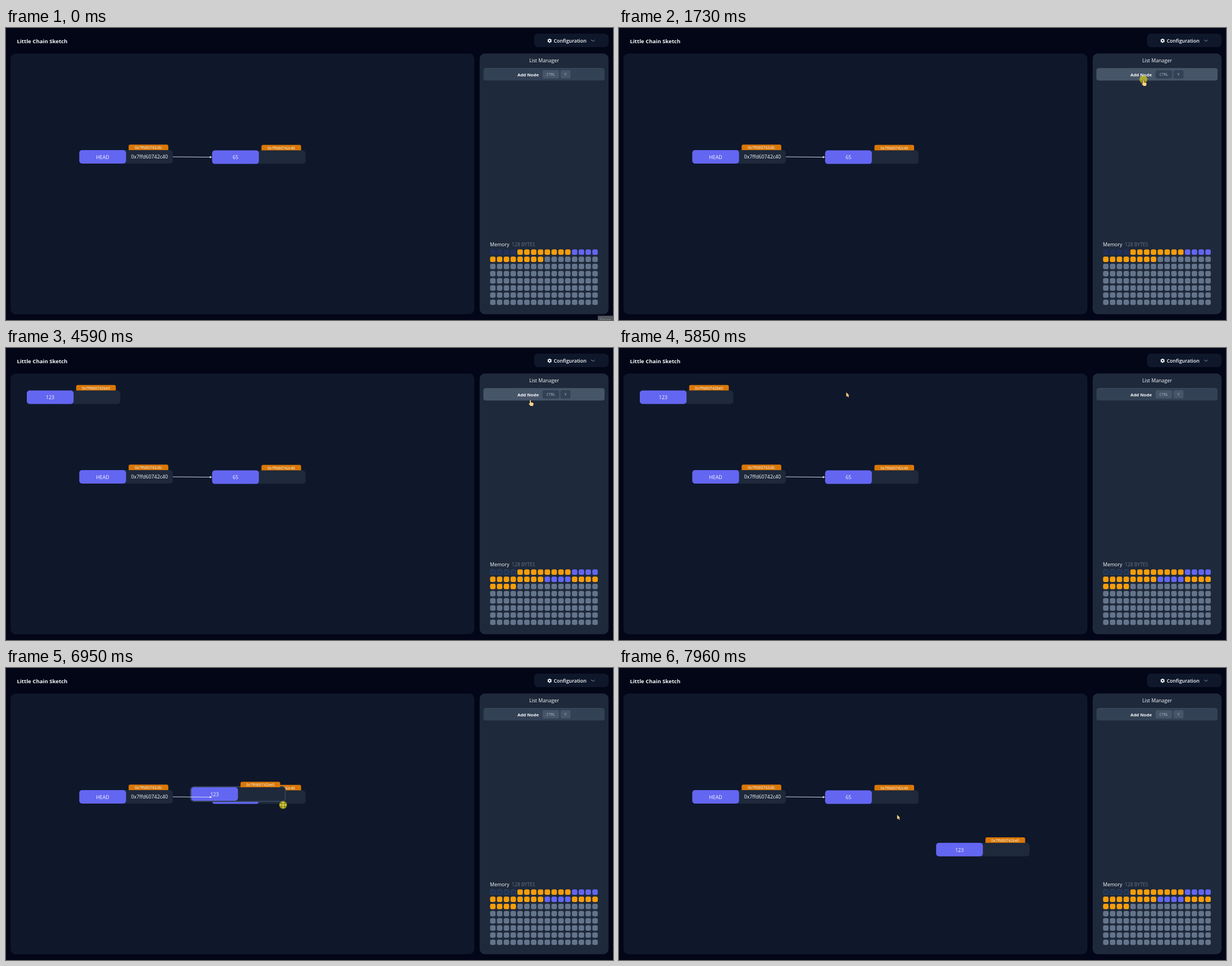
These frames come from a looping animation (1080 by 519 pixels, 8000 ms). An HTML page with a canvas:

```html
<!DOCTYPE html>
<html lang="en">
<head>
<meta charset="utf-8">
<title>Little Chain Sketch</title>
<style>
  html, body { margin: 0; width: 100%; height: 100%; overflow: hidden; background: #020617; }
  canvas { display: block; }
</style>
</head>
<body>
<canvas id="stage" width="1080" height="519"></canvas>
<script>
const ctx = document.getElementById('stage').getContext('2d');
const LOOP = 8000, TICK = 70;
const OPEN_FORM = 1880, SUBMIT = 4450, GRAB = 6460, DROP = 7355;
const WHITE = '#f8fafc', INDIGO = '#6366f1', AMBER = '#f59e0b';
const S900 = '#0f172a', S800 = '#1e293b', S700 = '#334155', S600 = '#475569', S500 = '#64748b', S400 = '#94a3b8';

// Paths: [time, x, y]
const cursorPath = [
  [430, 985, 495], [770, 945, 250], [1120, 922, 105], [1180, 922, 105], [1660, 933, 91.5],
  [5310, 933, 91.5], [5450, 857, 43], [5590, 710, 22], [5940, 200, 116], [6040, 145, 124],
  [6180, 168, 95], [6460, 168, 95], [6600, 202.5, 123.5], [6740, 302, 168], [6950, 493, 243.5],
  [7210, 656, 305], [7280, 698, 329], [7355, 698, 329], [7960, 494.5, 260.5]
];
const nodePath = [
  [6460, 37, 75.5], [6600, 57, 93.5], [6740, 146, 136], [6950, 329.5, 212],
  [7210, 502, 277], [7280, 564.2, 310.7]
];

const clamp = v => Math.max(0, Math.min(1, v));

// Position on a path, advanced in ticks like a screen recording
function along(path, t) {
  const i = path.findIndex(p => p[0] > t);
  if (i === 0) return path[0].slice(1);
  if (i < 0) return path[path.length - 1].slice(1);
  const [t0, x0, y0] = path[i - 1], [t1, x1, y1] = path[i];
  const n = Math.max(1, Math.round((t1 - t0) / TICK));
  const k = Math.floor((t - t0) / (t1 - t0) * n + 1e-6) / n;
  return [x0 + (x1 - x0) * k, y0 + (y1 - y0) * k];
}

function box(x, y, w, h, r, fill, stroke, width = 1) {
  ctx.beginPath();
  ctx.roundRect(x, y, w, h, r);
  if (fill) { ctx.fillStyle = fill; ctx.fill(); }
  if (stroke) { ctx.strokeStyle = stroke; ctx.lineWidth = width; ctx.stroke(); }
}

function text(s, x, y, size, color = WHITE, weight = 400, align = 'center') {
  ctx.font = `${weight} ${size}px "Open Sans", "Noto Sans", sans-serif`;
  ctx.textAlign = align;
  ctx.fillStyle = color;
  ctx.fillText(s, x, y);
}

function line(points, color, width) {
  ctx.beginPath();
  points.forEach(([x, y]) => ctx.lineTo(x, y));
  ctx.strokeStyle = color;
  ctx.lineWidth = width;
  ctx.stroke();
}

function shape(d, x, y, fill, stroke) {
  const p = new Path2D(d);
  ctx.save();
  ctx.translate(x, y);
  ctx.fillStyle = fill;
  ctx.strokeStyle = stroke;
  ctx.lineWidth = 0.9;
  ctx.stroke(p);
  ctx.fill(p);
  ctx.restore();
}

function node(x, y, label, address, next = '', lifted = false) {
  if (lifted) box(x - 1, y - 1, 168.4, 26, 6, S800, S700, 2);
  box(x, y, 166.4, 24, 5, S800);
  box(x, y, 83.2, 24, 5, INDIGO);
  box(x + 87.8, y - 9.8, 70.6, 9.8, [3, 3, 0, 0], '#d97706');
  text(address, x + 123, y - 1.8, 6.6);
  text(label, x + 41.6, y + 15.8, 8.8);
  text(next, x + 124.8, y + 15.4, 8.8);
}

function header() {
  text('Little Chain Sketch', 19.5, 26.5, 9.6, WHITE, 700, 'left');
  box(939.5, 10, 132.5, 24, 7, S900);
  ctx.beginPath();
  ctx.arc(967.2, 22.6, 2.2, 0, 7);
  ctx.strokeStyle = WHITE;
  ctx.lineWidth = 1.8;
  ctx.stroke();
  for (let i = 0; i < 6; i++) {
    const c = Math.cos(i * Math.PI / 3 + 0.52), s = Math.sin(i * Math.PI / 3 + 0.52);
    line([[967.2 + 2.6 * c, 22.6 + 2.6 * s], [967.2 + 3.9 * c, 22.6 + 3.9 * s]], WHITE, 1.7);
  }
  text('Configuration', 974.5, 25.9, 8.8, WHITE, 600, 'left');
  line([[1041.2, 20.9], [1044.3, 24], [1047.4, 20.9]], S400, 1);
}

function addButton(hover) {
  box(849.5, 71.5, 215.5, 21.8, 4, S700);
  ctx.globalAlpha = hover;
  box(849.5, 71.5, 215.5, 21.8, 4, S600);
  ctx.globalAlpha = 1;
  line([[853, 71.8], [1061, 71.8]], S600, 0.7);
  text('Add Node', 929, 85.7, 7.8, WHITE, 700);
  for (const [label, x, w] of [['CTRL', 954.7, 29.5], ['Y', 986.6, 17.8]]) {
    box(x, 75, w, 14.8, 3, S600);
    ctx.globalAlpha = hover;
    box(x, 75, w, 14.8, 3, S700);
    ctx.globalAlpha = 1;
    text(label, x + w / 2, 85, 6.4, S400, 600);
  }
}

function form(t) {
  box(849, 71, 216.5, 23, 4.5, S700, '#0b0f16', 1);
  box(848.5, 70.5, 217.5, 24, 5, null, WHITE, 1.2);
  const typed = t < 4095 ? '' : t < 4190 ? '12' : '123';
  text(typed || 'Data', 854, 85.6, 7.7, typed ? WHITE : S400, 400, 'left');
  if (typed || Math.floor((t - OPEN_FORM) / 530) % 2 === 0) {
    const x = 854.5 + (typed ? ctx.measureText(typed).width : 0);
    line([[x, 77.5], [x, 88.5]], WHITE, 0.8);
  }
  box(849.5, 97.3, 215.5, 21.8, 4, S700);
  text('Add', 957.3, 111.3, 7.8, WHITE, 700);
}

function memory(t) {
  text('Memory', 861, 387.8, 8.8, WHITE, 400, 'left');
  text('128 BYTES', 899.8, 387.8, 8.6, S500, 400, 'left');
  for (let i = 0; i < 128; i++) {
    const x = 861.3 + (i % 16) * 12.13, y = 393.6 + Math.floor(i / 16) * 12.72;
    if (i < 4) {
      box(x, y, 9.7, 9.7, 3, '#222e5a');
      if (t >= OPEN_FORM) {
        ctx.setLineDash([2, 1.5]);
        box(x + 0.4, y + 0.4, 8.9, 8.9, 3, '#1f3152', '#41687a', 0.8);
        ctx.setLineDash([]);
      }
      continue;
    }
    const added = t >= SUBMIT && i < 36;
    const data = (i > 11 && i < 16) || (added && i > 23 && i < 28);
    box(x, y, 9.7, 9.7, 3, data ? INDIGO : i < 24 || added ? AMBER : S500);
  }
}

function cursor(t) {
  if (t < 430) return;
  const [x, y] = along(cursorPath, t);
  const pressed = (t >= 1730 && t < OPEN_FORM) || (t >= GRAB && t < DROP);
  if (pressed) {
    ctx.beginPath();
    ctx.arc(x, y, 7, 0, 7);
    ctx.fillStyle = 'rgba(255, 240, 0, .54)';
    ctx.fill();
  }
  const overButton = (t >= 1320 && t < OPEN_FORM) || (t >= SUBMIT && t < 5380);
  if (overButton) {
    shape('M-1 .8Q0 0 .8 1V4.5L4.8 5.5Q6 6 5.6 8L4.5 11H.2L-2.8 7.5Q-3 6-1 7Z', x, y + 0.5, '#fbd38d', '#2a2118');
  } else if (t >= OPEN_FORM && t < SUBMIT) {
    line([[x - 1, 86.5], [x + 3, 86.5]], '#1b2028', 0.9);
    line([[x + 1, 86.5], [x + 1, 95]], '#1b2028', 0.9);
    line([[x - 1, 95], [x + 3, 95]], '#1b2028', 0.9);
  } else if (t >= 6110 && t < DROP) {
    for (let i = 0; i < 4; i++) {
      ctx.save();
      ctx.translate(x, y);
      ctx.rotate(i * Math.PI / 2);
      line([[0, 0], [5.4, 0]], '#f5ea6a', 1);
      line([[3.9, -1.5], [5.4, 0], [3.9, 1.5]], '#f5ea6a', 0.9);
      ctx.restore();
    }
  } else {
    shape('M.4 .4V8.2L2.2 6.6L3.6 9.4L5 8.7L3.6 6H5.8Z', x, y, '#fbd38d', '#2a2118');
  }
}

function draw(t) {
  box(0, 0, 1080, 519, 0, '#020617');
  header();
  box(8, 45.3, 825.3, 463.4, 9, S900);
  box(842.7, 45.3, 229.3, 463.4, 9, S800);
  text('List Manager', 957.3, 61.3, 8.8);

  const hover = t < OPEN_FORM ? clamp((t - 1320) / 150)
    : t < 5380 ? clamp((t - SUBMIT) / 140)
    : 1 - clamp((t - 5380) / 150);
  if (t >= OPEN_FORM && t < SUBMIT) form(t); else addButton(hover);
  memory(t);

  node(130.4, 217, 'HEAD', '0x7ffd60742c8c', '0x7ffd60742c40');
  node(366.7, 217.6, '65', '0x7ffd60742c40');
  if (t >= SUBMIT) {
    const [x, y] = along(nodePath, t);
    node(x, y, '123', '0x7ffd60742be0', '', t >= GRAB && t < DROP);
  }
  line([[297, 229], [364, 229.6]], '#e2e8f0', 0.9);
  shape('M0 0L-4.2-2L-3.4 0L-4.2 2Z', 366.6, 229.6, WHITE, 'transparent');

  if (t < 70) {
    box(1053, 511.5, 27, 8, 0, '#55585f');
    text('Pause', 1057, 521, 7, '#8b8e94', 400, 'left');
  }
  cursor(t);
}

const start = performance.now();
function frame() {
  draw((performance.now() - start) % LOOP);
  requestAnimationFrame(frame);
}
frame();
</script>
</body>
</html>
```
